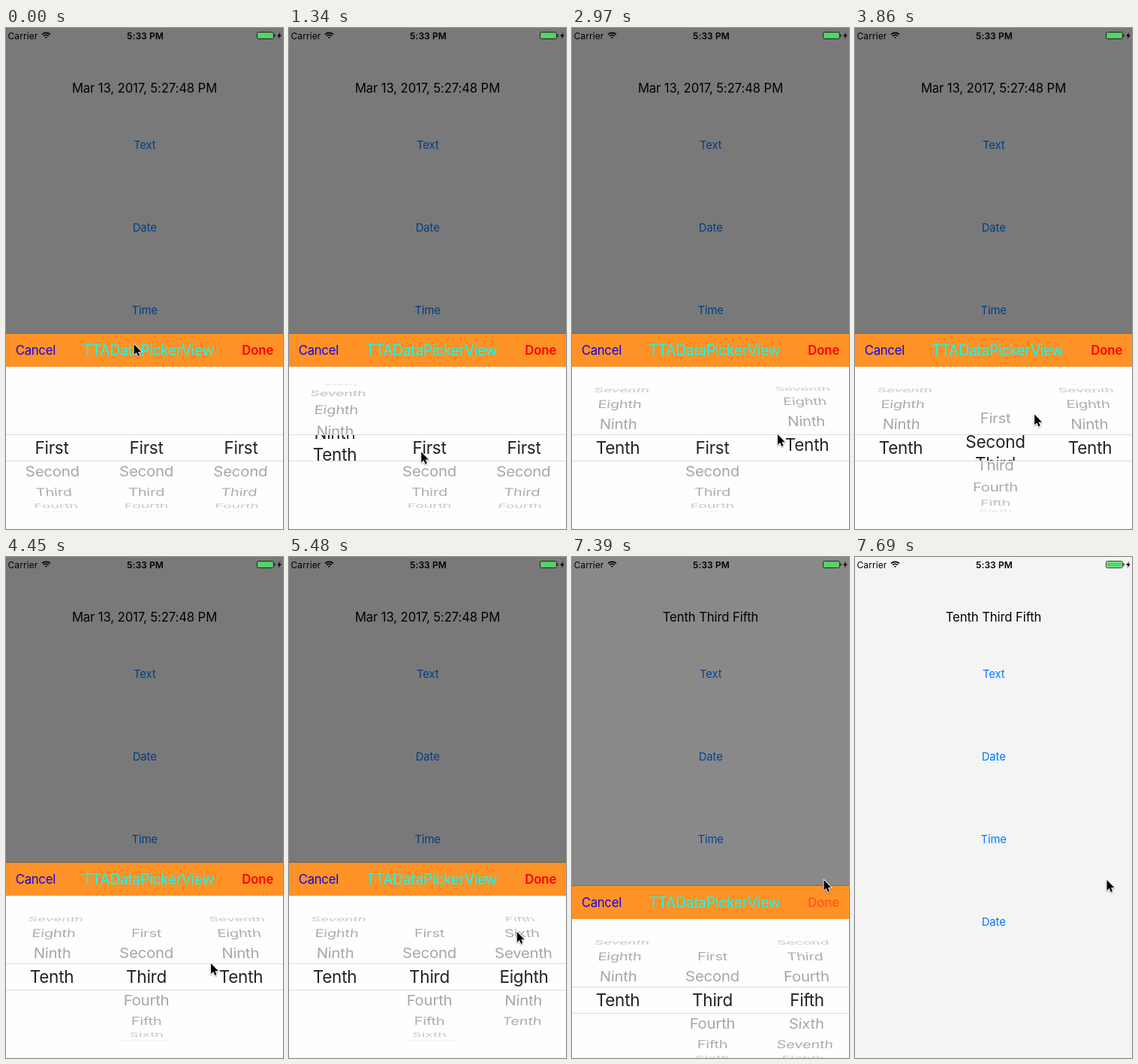
These frames come from a looping animation (369 px wide and 667 px high, 7.99 s). An HTML page with a canvas:

```html
<!DOCTYPE html>
<html lang="en">
<head>
<meta charset="utf-8">
<title>Picker view</title>
<style>
  html, body { margin: 0; width: 100%; height: 100%; overflow: hidden; background: #f4f4f4; }
  canvas { display: block; width: 369px; height: 667px; }
</style>
</head>
<body>
<canvas id="stage"></canvas>
<script>
const W = 369, H = 667, LOOP = 7990, TICK = 147.7, LAST_TICK = 52;
const FONT = 'Inter, "Open Sans", sans-serif';
const ROWS = ['First', 'Second', 'Third', 'Fourth', 'Fifth',
  'Sixth', 'Seventh', 'Eighth', 'Ninth', 'Tenth'];
const PANEL_TOP = 407, BAR_H = 44, MID_X = 187, MID_Y = 559, COLUMN_W = 126;
const BAND_TOP = 542, BAND_H = 34;
// Wheel geometry: radius, angle between rows, viewing distance
const RADIUS = 84.8, STEP = 21.8 * Math.PI / 180, DEPTH = 1100, LENS_PITCH = 29;

const canvas = document.getElementById('stage');
const ctx = canvas.getContext('2d');
const dpr = window.devicePixelRatio || 1;
canvas.width = W * dpr;
canvas.height = H * dpr;

const clamp = p => Math.min(1, Math.max(0, p));
const smooth = p => p * p * (3 - 2 * p);
const easeOut = p => 1 - (1 - p) ** 3;

// A flick turns a wheel by some rows, slowing down to a stop
const flick = (start, duration, rows) => t => rows * easeOut(clamp((t - start) / duration));

const wheels = [
  [flick(450, 1300, 9)],
  [flick(3620, 800, 2)],
  [flick(1800, 1000, 9.3), flick(2820, 600, -0.3), flick(4600, 830, -2), flick(5700, 870, -3)]
];

const wheelPos = (flicks, t) => flicks.reduce((sum, turn) => sum + turn(t), 0);

// Pointer stops; sway bends the way there: sideways, and down then up
const stops = [
  { t: 0, x: 170.5, y: 421 },
  { t: 1330, x: 176, y: 564, sway: [-50, 60] },
  { t: 2960, x: 274, y: 541, sway: [60, 50] },
  { t: 4440, x: 273, y: 541, sway: [-36, 45] },
  { t: 6360, x: 292.5, y: 446, sway: [20, -45] },
  { t: 6800, x: 335.5, y: 430, sway: [0, 0] }
];

function pointerAt(t) {
  const i = stops.findIndex(s => s.t > t);
  const b = stops.at(i), a = i < 0 ? b : stops[i - 1];
  if (a === b) return [b.x, b.y];
  const p = (t - a.t) / (b.t - a.t), q = smooth(p);
  return [
    a.x + (b.x - a.x) * q + b.sway[0] * Math.sin(Math.PI * p),
    a.y + (b.y - a.y) * q + b.sway[1] * Math.sin(2 * Math.PI * p)
  ];
}

// y is the middle of the capital letters
function text(str, x, y, size, color, spacing = 0, weight = 400, align = 'center') {
  ctx.font = `${weight} ${size}px ${FONT}`;
  ctx.letterSpacing = spacing + 'px';
  ctx.textAlign = align;
  ctx.fillStyle = color;
  ctx.fillText(str, x, y + size * 0.364);
}

function fillRect(x, y, w, h, color) {
  ctx.fillStyle = color;
  ctx.fillRect(x, y, w, h);
}

function polygon(points) {
  ctx.beginPath();
  points.forEach(([x, y]) => ctx.lineTo(x, y));
  ctx.closePath();
}

function clipped(rects, draw) {
  ctx.save();
  ctx.beginPath();
  rects.forEach(r => ctx.rect(...r));
  ctx.clip();
  draw();
  ctx.restore();
}

function drawPage(t) {
  fillRect(0, 0, W, H, '#f4f4f4');
  const result = t < 7200 ? 'Mar 13, 2017, 5:27:48 PM' : 'Tenth Third Fifth';
  text(result, 184.5, 80, 16.7, '#000', -0.12);
  ['Text', 'Date', 'Time', 'Date'].forEach((label, i) =>
    text(label, 184.7, 156 + i * 110, 14.8, '#007aff', -0.1));
}

function drawStatus() {
  text('Carrier', 2.5, 10.5, 12, '#000', 0.1, 400, 'left');
  text('5:33 PM', 185.5, 10.5, 12, '#000', 0.1, 600);

  ctx.strokeStyle = '#000';
  ctx.lineWidth = 1.7;
  [1.3, 4.6, 7.6].forEach(r => {
    ctx.beginPath();
    ctx.arc(53.5, 14, r, -Math.PI * 0.75, -Math.PI * 0.25);
    ctx.stroke();
  });

  ctx.lineWidth = 0.9;
  ctx.strokeStyle = '#222';
  ctx.beginPath();
  ctx.roundRect(334.5, 5.5, 22, 9, 1.8);
  ctx.stroke();
  fillRect(335.5, 6.5, 20, 7, '#4cd964');
  fillRect(357.3, 8.3, 1.3, 3.6, '#222');
  polygon([[365.2, 5.5], [361.2, 10.9], [363.8, 10.9], [362.7, 14.8], [366.9, 9.2], [364.2, 9.2]]);
  ctx.fillStyle = '#000';
  ctx.fill();
}

function drawDimRows(x, pos) {
  ROWS.forEach((name, i) => {
    const angle = (i - pos) * STEP;
    if (Math.abs(angle) > 1.54) return;
    const sin = Math.sin(angle), cos = Math.cos(angle);
    const scale = DEPTH / (DEPTH + RADIUS * (1 - cos));
    ctx.save();
    ctx.globalAlpha = 1 - 0.65 * sin ** 6;
    ctx.transform(scale, 0, (MID_X - x) / DEPTH * sin, cos * scale,
      MID_X + (x - MID_X) * scale, MID_Y + RADIUS * sin);
    text(name, 0, 0, 20.5, '#a6a6a6', -0.25);
    ctx.restore();
  });
}

function drawLensRows(x, pos) {
  ROWS.forEach((name, i) => {
    const d = i - pos;
    if (Math.abs(d) < 1) text(name, x, MID_Y + d * LENS_PITCH, 22.5, '#222', -0.25);
  });
}

function drawPanel(t) {
  const barY = PANEL_TOP + BAR_H / 2 + 0.3;
  const pressed = t > 7080;
  fillRect(0, PANEL_TOP - 0.6, W, 0.6, 'rgba(0,0,0,.3)');
  fillRect(0, PANEL_TOP, W, BAR_H, '#ff9226');
  fillRect(0, PANEL_TOP + BAR_H, W, H - PANEL_TOP, '#fefefe');
  text('Cancel', 12.7, barY, 16.7, '#1400e6', -0.25, 400, 'left');
  text('TTADataPickerView', 189.8, barY, 19.5, '#00ffff', -0.42);
  text('Done', 356.2, barY, 16.7, pressed ? '#ff5d18' : '#ff0000', -0.1, 600, 'right');

  const turned = wheels.map((flicks, i) => [MID_X + (i - 1) * COLUMN_W, wheelPos(flicks, t)]);
  const bandEnd = BAND_TOP + BAND_H;
  clipped([[0, 470, W, BAND_TOP - 470], [0, bandEnd, W, 647 - bandEnd]],
    () => turned.forEach(w => drawDimRows(...w)));
  clipped([[0, BAND_TOP, W, BAND_H]], () => turned.forEach(w => drawLensRows(...w)));
  fillRect(0, BAND_TOP - 1, W, 1, '#dcdcdc');
  fillRect(0, bandEnd, W, 1, '#dcdcdc');
}

function drawPointer(x, y) {
  ctx.save();
  ctx.translate(x, y);
  polygon([[0, 0], [0, 14], [3.2, 11], [5.4, 16], [7.6, 15], [5.5, 10.2], [9.8, 10]]);
  ctx.shadowColor = 'rgba(0,0,0,.35)';
  ctx.shadowBlur = 2 * dpr;
  ctx.shadowOffsetY = dpr;
  ctx.lineJoin = 'round';
  ctx.lineWidth = 1.8;
  ctx.strokeStyle = '#fff';
  ctx.stroke();
  ctx.shadowColor = 'transparent';
  ctx.fillStyle = '#000';
  ctx.fill();
  ctx.restore();
}

function draw(t) {
  const slide = smooth(clamp((t - 7335) / 300));
  ctx.setTransform(dpr, 0, 0, dpr, 0, 0);
  drawPage(t);
  if (slide < 1) {
    fillRect(0, 0, W, H, `rgba(0,0,0,${0.5 * (1 - slide)})`);
    ctx.save();
    ctx.translate(0, Math.round(slide * (H - PANEL_TOP)));
    drawPanel(t);
    ctx.restore();
  }
  drawStatus();
  drawPointer(...pointerAt(t));
}

// The picture advances in even ticks
function tick(now) {
  const elapsed = Math.max(0, now - start) % LOOP;
  draw(Math.min(LAST_TICK, Math.floor(elapsed / TICK)) * 148);
  requestAnimationFrame(tick);
}

const start = performance.now();
draw(0);
requestAnimationFrame(tick);
</script>
</body>
</html>
```
